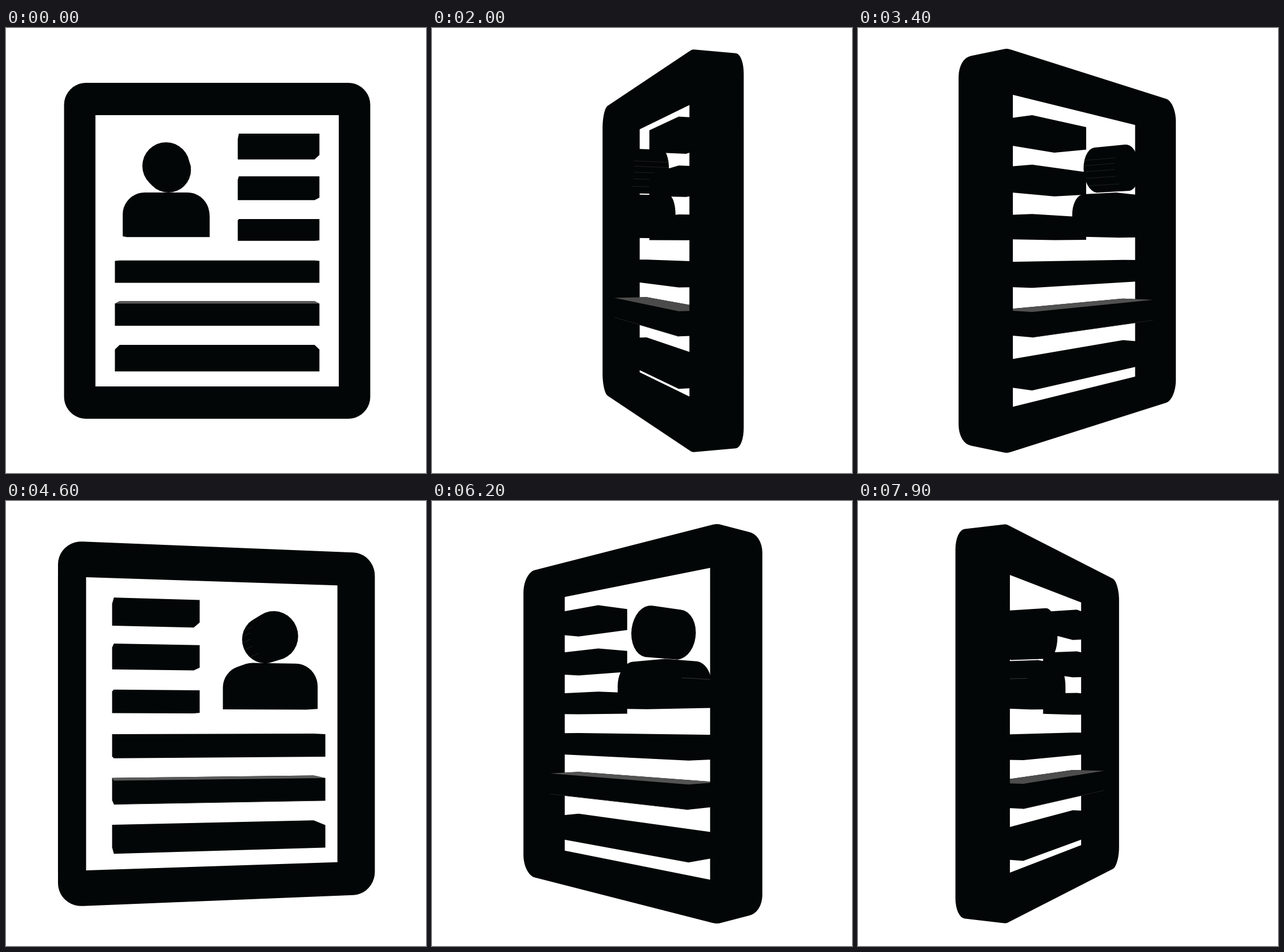
Animation of 727x771 px, one loop 8 s. Source, as an HTML page with a canvas:

```html
<!DOCTYPE html>
<html lang="en">
<head>
<meta charset="utf-8">
<title>Turning profile card</title>
<style>
  html, body { margin: 0; width: 100%; height: 100%; overflow: hidden; background: #fff; }
  canvas { display: block; }
</style>
</head>
<body>
<canvas id="stage" width="727" height="771"></canvas>
<script>
const ctx = document.getElementById('stage').getContext('2d');
const INK = '#030606', EDGE = '#1e2020';
const CX = 363.8, CY = 386, DIST = 1340, SHIFT = 1.7;
const FRONT = 0, BACK = -66;
const LOOP = 8000, STEP = 100;
const RAD = Math.PI / 180;

// Outlines in the plane of the card, measured from its centre
function arc(x, y, r, from, to, n = 10) {
  return Array.from({ length: n + 1 }, (_, i) => {
    const a = (from + (to - from) * i / n) * RAD;
    return [x + r * Math.cos(a), y + r * Math.sin(a)];
  });
}
const rect = (l, t, r, b) => [[l, t], [r, t], [r, b], [l, b]];

const W = 265, H = 291, R = 38;
const outer = [
  ...arc(R - W, R - H, R, 180, 270), ...arc(W - R, R - H, R, 270, 360),
  ...arc(W - R, H - R, R, 0, 90), ...arc(R - W, H - R, R, 90, 180)
];
const hole = rect(-221, -246.6, 221, 246.6);
const head = arc(-88.5, -147, 41, 0, 360, 32);
const body = [
  ...arc(-125.5, -63, 38, 180, 270), ...arc(-51.5, -63, 38, 270, 360),
  [-13.5, -25], [-163.5, -25]
];
const shortBars = [-203, -129, -55].map(y => rect(37.5, y, 177, y + 37));
const longBars = [17.5, 91.5, 171].map(y => rect(-177, y, 177, y + 38));
const headEdges = [-20, -6, 9, 26, 48].map(a =>
  [-88.5 + 41 * Math.cos(a * RAD), -147 + 41 * Math.sin(a * RAD), a]);

let sin = 0, cos = 1;
let opening = [];  // edge of the window on the side facing the viewer

function project([x, y], z) {
  const px = (x + SHIFT) * cos - z * sin;
  const pz = (x + SHIFT) * sin + z * cos;
  const s = 1 / (1 - pz / DIST);
  return [CX + px * s, CY + y * s];
}

function hull(points) {
  points.sort((a, b) => a[0] - b[0] || a[1] - b[1]);
  const half = list => {
    const out = [];
    for (const p of list) {
      while (out.length > 1) {
        const [a, b] = out.slice(-2);
        if ((b[0] - a[0]) * (p[1] - a[1]) - (b[1] - a[1]) * (p[0] - a[0]) > 0) break;
        out.pop();
      }
      out.push(p);
    }
    return out.slice(0, -1);
  };
  return half(points).concat(half(points.slice().reverse()));
}

function trace(points) {
  ctx.beginPath();
  points.forEach(p => ctx.lineTo(p[0], p[1]));
  ctx.closePath();
}

function fill(points, color) {
  trace(points);
  ctx.fillStyle = color;
  ctx.fill();
}

function line(a, b, color) {
  ctx.beginPath();
  ctx.moveTo(...a);
  ctx.lineTo(...b);
  ctx.strokeStyle = color;
  ctx.lineWidth = 1;
  ctx.stroke();
}

function inOpening(paint) {
  ctx.save();
  trace(opening);
  ctx.clip();
  paint();
  ctx.restore();
}

const face = (shape, z) => shape.map(p => project(p, z));
const solid = shape => fill(hull([...face(shape, FRONT), ...face(shape, BACK)]), INK);
const ridge = (p, color) => line(project(p, FRONT), project(p, BACK), color);

function drawPerson() {
  solid(head);
  solid(body);
  inOpening(() => {
    for (const [x, y, a] of headEdges) {
      const facing = Math.cos(a * RAD) * (DIST * sin - x) - Math.sin(a * RAD) * y;
      if (facing > 0) ridge([x, y], EDGE);
    }
    if (DIST * sin < -163) ridge([-163, -70], '#343636');
  });
}

const drawShortBars = () => shortBars.forEach(solid);

function drawLongBars(nearZ) {
  longBars.forEach(solid);
  const [tl, tr, br, bl] = longBars[1];
  const shade = 68 + 22 * Math.abs(cos);
  inOpening(() => {
    fill([project(tl, FRONT), project(tr, FRONT), project(tr, BACK), project(tl, BACK)],
      `rgb(${shade},${shade},${shade})`);
    line(project(bl, nearZ), project(br, nearZ), EDGE);
  });
}

const ease = (t, from, to) => {
  const k = Math.min(1, Math.max(0, (t - from) / (to - from)));
  return k * k * (3 - 2 * k);
};

// Steady turn that runs slightly faster while the card is edge-on
const angle = t => 36 * t + 4.3 * (ease(t, 2.1, 3.3) + ease(t, 6.4, 7.7));

function draw(ms) {
  const a = angle(ms / 1000) * RAD;
  sin = Math.sin(a);
  cos = Math.cos(a);
  ctx.fillStyle = '#fff';
  ctx.fillRect(0, 0, 727, 771);
  solid(outer);

  const eye = DIST * cos;
  if (eye <= FRONT && eye >= BACK) return;
  const [nearZ, farZ] = eye > FRONT ? [FRONT, BACK] : [BACK, FRONT];
  opening = face(hole, nearZ);
  inOpening(() => fill(face(hole, farZ), '#fff'));

  const parts = [drawPerson, drawShortBars];
  if (sin < 0) parts.reverse();
  parts.forEach(part => part());
  drawLongBars(nearZ);
}

const start = performance.now();
function tick() {
  const t = (performance.now() - start) % LOOP;
  draw(Math.floor(t / STEP) * STEP);
  requestAnimationFrame(tick);
}
tick();
</script>
</body>
</html>
```
